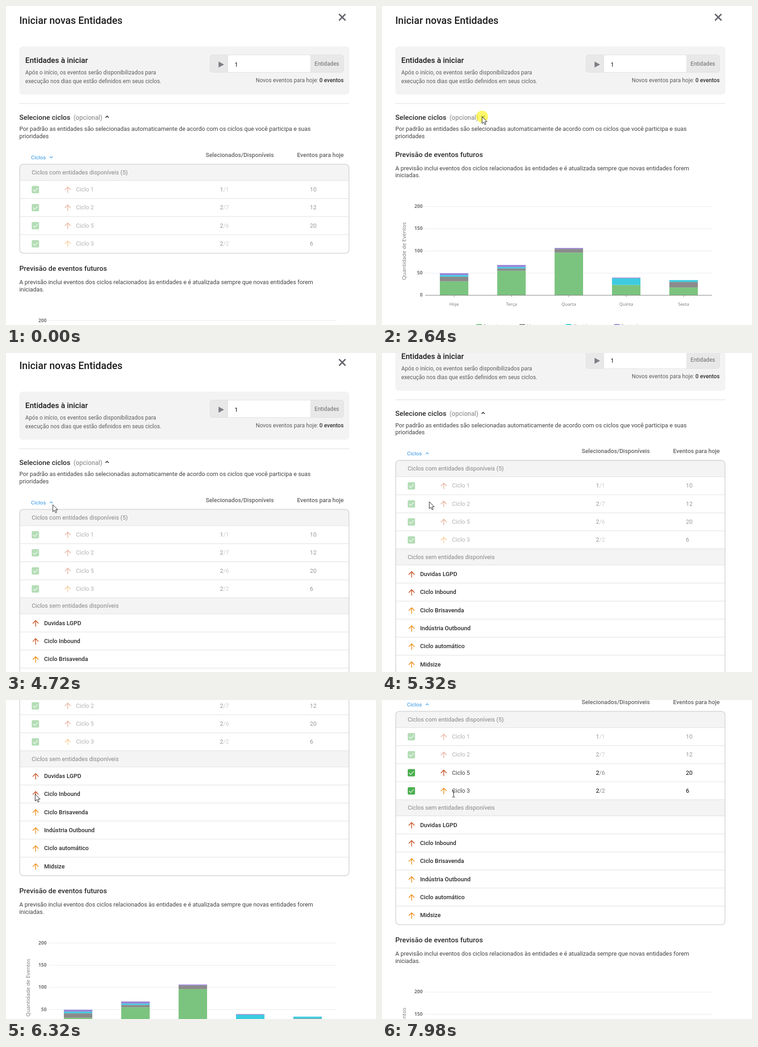
These frames come from a looping animation (806x695 px, 8 s). An HTML page:

```html
<!DOCTYPE html>
<html lang="pt">
<head>
<meta charset="utf-8">
<title>Iniciar novas Entidades</title>
<style>
html, body { margin: 0; height: 100%; overflow: hidden; background: #fff; }
svg { display: block; width: 100vw; height: 100vh; }
text { font: 12.8px Roboto, sans-serif; fill: #424242; white-space: pre; }
.title { font-size: 21.7px; font-weight: 500; fill: #1d1d1f; }
.card { font-size: 16.6px; font-weight: 500; fill: #1a1a1a; }
.head { font-size: 15.3px; font-weight: 500; fill: #2b2b2b; }
.opt { font-size: 13.9px; font-weight: 500; fill: #979797; }
.note { font-size: 12.16px; fill: #5c5c5c; }
.link { font-size: 11.8px; fill: #2b93e6; }
.col { font-weight: 500; fill: #666; }
.group { fill: #868686; }
.name { font-weight: 500; fill: #2b2b2b; }
.num { fill: #000; }
.axis { font: 9.6px "Open Sans", sans-serif; fill: #757575; }
.tick { font: bold 10.5px "Open Sans", sans-serif; fill: #757575; text-anchor: end; }
.unit { font: 11.6px "Open Sans", sans-serif; fill: #757575; text-anchor: middle; }
.line { fill: none; stroke-width: 1.7; }
</style>
</head>
<body>
<svg id="stage" viewBox="0 0 806 695"></svg>
<script>
const RED = '#cb5a2d', ORANGE = '#ef9322';
const ROW = 39.3, PANEL = 248.5, EXTRA = 270.8;

const text = (x, y, str, cls = '', more = '') => `<text x="${x}" y="${y}" class="${cls}" ${more}>${str}</text>`;
const rect = (x, y, w, h, fill, more = '') => `<rect x="${x}" y="${y}" width="${w}" height="${h}" fill="${fill}" ${more}/>`;
const line = (d, color, more = '') => `<path class="line" d="${d}" stroke="${color}" ${more}/>`;
const rule = (y, color = '#dedede', x = 30, end = 747) => rect(x, y - .5, end - x, 1, color);
const arrow = (x, y, color) => line(`M${x} ${y + 6.8}v-13m-6.3 6.5l6.3-6.5 6.3 6.5`, color);

const intro = () =>
  text(29, 39, 'Iniciar novas Entidades', 'title') +
  line('M725.5 17.5l14 14m0-14l-14 14', '#606067', 'style="stroke-width:3"') +
  rect(29, 88, 719, 105, '#f3f3f3', 'rx="8"') +
  text(42, 124, 'Entidades à iniciar', 'card') +
  text(42, 148.8, 'Após o início, os eventos serão disponibilizados para', 'note') +
  text(42, 168, 'execução nos dias que estão definidos em seus ciclos.', 'note') +
  rect(444.5, 106.5, 291, 38, '#e8e8e8', 'rx="5" stroke="#e0e0e0"') +
  rect(484, 107, 179, 37, '#fff') +
  '<path d="M463 121l12 6.5-12 6.5z" fill="#7e7e86"/>' +
  text(498, 131.5, '1', 'num') +
  text(672, 130, 'Entidades', 'note', 'style="fill:#6a6a6a"') +
  text(735.5, 165.8, 'Novos eventos para hoje: <tspan font-weight="500" fill="#333">0 eventos</tspan>', 'note', 'text-anchor="end"') +
  rect(29, 211.5, 719, 2, '#ebebeb') +
  text(29, 247.5, 'Selecione ciclos', 'head') +
  text(147, 247.5, '(opcional)', 'opt') +
  line('M-3.5 2l3.5-3.5 3.5 3.5', '#333', 'id="mainChevron"') +
  text(29, 272.3, 'Por padrão as entidades são selecionadas automaticamente de acordo com os ciclos que você participa e suas') +
  text(29, 287.8, 'prioridades');

const cycleRow = ([name, chosen, total, events, color], i) => {
  const y = 399.8 + ROW * i;
  return `<g id="row${i}">` +
    rect(56, y - 7.8, 16, 16, '#4caf50', 'rx="2.5"') +
    line(`M59 ${y + .3}l3.5 3.6 6.7-6.9`, '#fff', 'style="stroke-width:1.2"') +
    arrow(134.5, y + .5, color) +
    text(152.5, y + 4.2, name) +
    text(466, y + 4.2, `${chosen}<tspan fill="#858585">/${total}</tspan>`, 'num') +
    text(662, y + 4.2, events, 'num') + '</g>' +
    rule(380.2 + ROW * i);
};

const plainRow = ([name, color], i) => {
  const y = 592.3 + ROW * i;
  return arrow(64.5, y + .8, color) + text(83, y + 4.5, name, 'name') + rule(572.5 + ROW * i);
};

const table = () =>
  text(54.5, 333.5, 'Ciclos', 'link') +
  line('M-3 1.5l3-3 3 3', '#2b93e6', 'id="listChevron" style="stroke-width:1.2"') +
  text(435, 328.8, 'Selecionados/Disponíveis', 'col') +
  text(634, 328.8, 'Eventos para hoje', 'col') +
  '<path d="M30 380v-28a7 7 0 0 1 7-7h703a7 7 0 0 1 7 7v28z" fill="#f4f4f4"/>' +
  text(56, 367, 'Ciclos com entidades disponíveis (5)', 'group') +
  [['Ciclo 1', 1, 1, 10, RED], ['Ciclo 2', 2, 7, 12, RED], ['Ciclo 5', 2, 6, 20, RED], ['Ciclo 3', 2, 2, 6, ORANGE]]
    .map(cycleRow).join('') +
  '<g id="list">' +
  rect(30, 537.3, 717, 35, '#f4f4f4') + rule(537.3) +
  text(56, 559.3, 'Ciclos sem entidades disponíveis', 'group') +
  [['Duvidas LGPD', RED], ['Ciclo Inbound', RED], ['Ciclo Brisavenda', ORANGE],
    ['Indústria Outbound', ORANGE], ['Ciclo automático', ORANGE], ['Midsize', ORANGE]].map(plainRow).join('') +
  '</g>' +
  rect(29.8, 344.6, 717.4, 194, 'none', 'id="frame" rx="8" stroke="#d8d8d8" stroke-width="1.8"');

const chart = () => {
  const base = 878.7, gap = 48.3;
  const colors = ['#7bc47f', '#8b8b8b', '#3dcbe0', '#9884d6'];
  const days = { Hoje: [30.5, 10, 3.5, 4], Terça: [53.5, 5, 3, 4.5], Quarta: [93, 8, 0, 2], Quinta: [22.5, 0, 14.5, 1.5], Sexta: [17, 12, 4, 0] };
  const legend = { Pesquisa: 205, Mensagem: 299, Checklist: 400, Produção: 505 };
  let out = '';
  for (let i = 0; i < 5; i++) {
    const y = base - gap * i;
    if (i) out += rule(y, '#e6e8ee', 94, 719);
    out += text(88.5, y + 3, i * 50, 'tick');
  }
  Object.entries(days).forEach(([day, parts], i) => {
    const x = 126 + 125 * i;
    let y = base;
    parts.forEach((h, k) => out += rect(x, y -= h, 62, h, colors[k]));
    out += rect(x + 30.5, base, 1, 4, '#8a8a8a') + text(x + 31, base + 23, day, 'axis', 'text-anchor="middle"');
  });
  Object.entries(legend).forEach(([label, x], i) =>
    out += rect(x, 941.5, 13, 9, colors[i], 'rx="2"') + text(x + 16, 949.5, label, 'axis'));
  return out + rule(base, '#777', 94, 719) +
    text(0, 0, 'Quantidade de Eventos', 'unit', 'transform="translate(52 782.5) rotate(-90)"');
};

const forecast = () =>
  text(29, 577, 'Previsão de eventos futuros', 'head') +
  text(29, 606, 'A previsão inclui eventos dos ciclos relacionados às entidades e é atualizada sempre que novas entidades forem') +
  text(29, 621.8, 'iniciadas.') + chart();

const stage = document.getElementById('stage');
stage.innerHTML =
  '<clipPath id="clip"><rect id="window" x="0" y="300" width="806"/></clipPath>' +
  `<g id="page">${intro()}<g clip-path="url(#clip)">${table()}</g><g id="forecast">${forecast()}</g></g>` +
  '<circle id="halo" r="13" fill="#fff21a" opacity=".65"/>' +
  '<g id="cursor"><path id="pointer" d="M0 0v15.2l3.5-3.2 2.5 5.4 2.5-1.1-2.4-5.2h4.7z" fill="#fff" stroke="#111"/>' +
  '<path id="beam" d="M-3-7h2.2l.8.8.8-.8h2.2M0-6.2v12.4M-3 7h2.2l.8-.8.8.8h2.2" fill="none" stroke="#111"/></g>';

const el = id => document.getElementById(id);
const set = (id, attrs) => { for (const k in attrs) el(id).setAttribute(k, attrs[k]); };
const show = (id, on) => set(id, { visibility: on ? 'visible' : 'hidden' });

// Keys are [time, ...values], eased between neighbours.
function track(keys, t) {
  const i = keys.findIndex(k => k[0] > t);
  if (i === 0) return keys[0].slice(1);
  if (i < 0) return keys[keys.length - 1].slice(1);
  const a = keys[i - 1], b = keys[i], p = (t - a[0]) / (b[0] - a[0]), e = p * p * (3 - 2 * p);
  return a.slice(1).map((v, k) => v + (b[k + 1] - v) * e);
}

const NOTCH = 320 / 3;
const scrollKeys = [[4670, 0], [5120, NOTCH], [5270, NOTCH], [5720, 2 * NOTCH], [6110, 2 * NOTCH],
  [6320, 4 * NOTCH], [6330, 4 * NOTCH], [6520, 3 * NOTCH]];
const openKeys = [[1110, 1], [1450, 0], [2740, 0], [3120, 1]];
const cursorKeys = [[120, 649, 634], [600, 123, 212], [900, 218, 241], [1120, 218, 241], [1400, 221, 217],
  [1700, 218, 241], [2780, 218, 241], [3500, 102, 330.5], [4720, 102, 330.5], [5120, 103, 324], [5640, 103, 324],
  [6040, 65.5, 201.5], [6120, 65.5, 201.5], [6320, 63.5, 205], [6520, 67, 177], [6680, 67, 177],
  [6920, 67, 157.5], [7320, 67, 157.5], [7580, 66, 193], [7800, 66, 193], [7980, 156, 204.5]];
const clicks = [[980, 1120], [2640, 2780], [3650, 3850], [7120, 7250], [7720, 7850]];

function draw(now) {
  // The screen refreshes fifteen times a second.
  const tick = 200 / 3, t = 122 + tick * Math.floor((now % 8000 - 100) / tick);
  const [scroll] = track(scrollKeys, t), [open] = track(openKeys, t), [x, y] = track(cursorKeys, t);
  const listed = t >= 3850, extra = listed ? EXTRA : 0, beam = t >= 7910;

  set('page', { transform: `translate(0 ${-scroll})` });
  set('window', { height: (PANEL + extra) * open });
  set('forecast', { transform: `translate(0 ${(PANEL + extra) * open - PANEL})` });
  set('frame', { height: 194 + extra });
  set('mainChevron', { transform: `translate(220.3 241.3) scale(1 ${2 * open - 1})` });
  set('listChevron', { transform: `translate(98.5 329.5) scale(1 ${listed ? 1 : -1})` });
  show('list', listed);
  [Infinity, Infinity, 7250, 7850].forEach((at, i) => set('row' + i, { opacity: t >= at ? 1 : .41 }));

  set('cursor', { transform: `translate(${x} ${y})` });
  set('halo', { cx: x, cy: y });
  show('halo', clicks.some(([a, b]) => t >= a && t < b));
  show('pointer', t >= 110 && !beam);
  show('beam', beam);
}

const start = performance.now();
(function loop() {
  draw(performance.now() - start);
  requestAnimationFrame(loop);
})();
</script>
</body>
</html>
```
